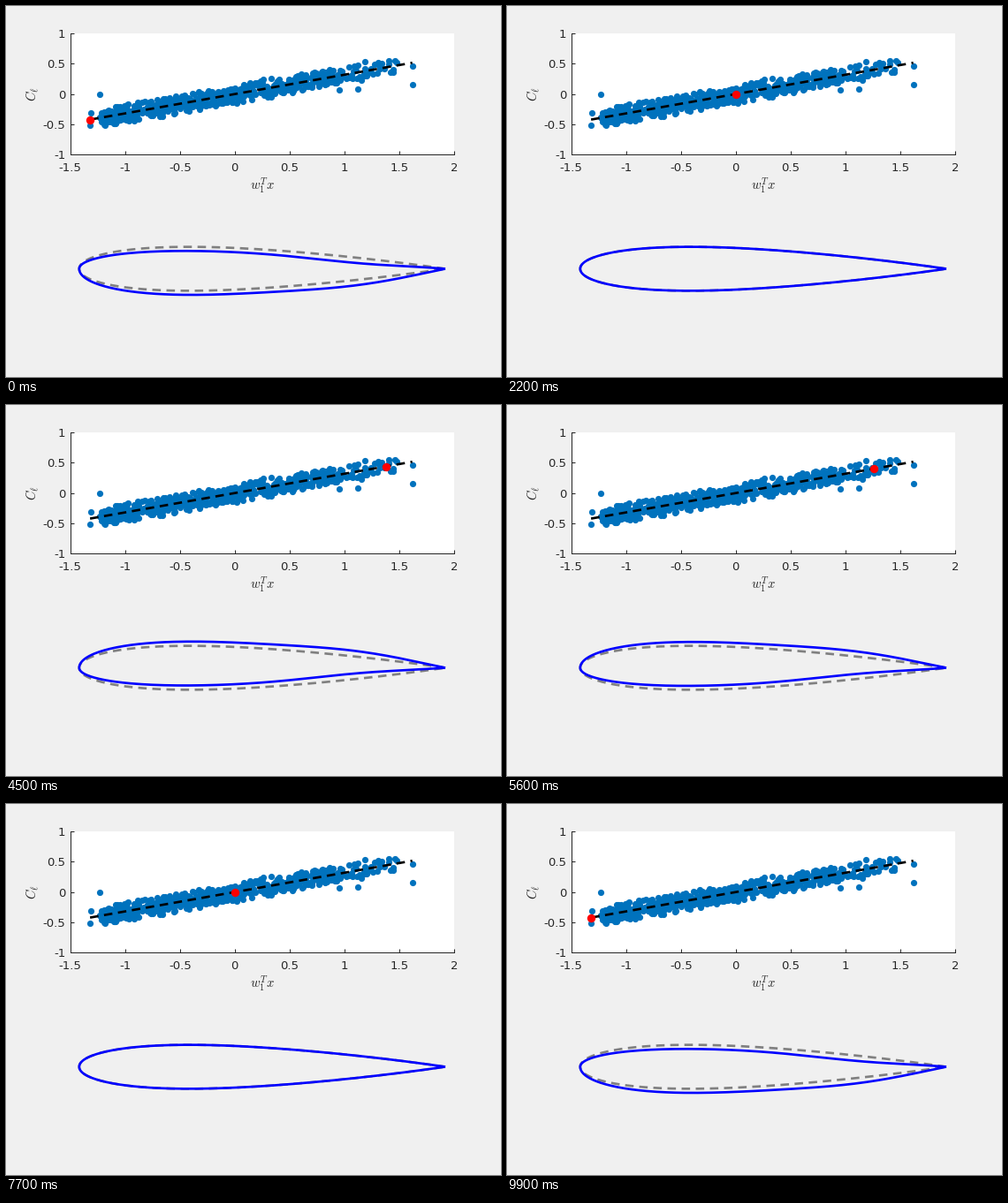
Recreate the animation shown at these times as a matplotlib script. Size 560 by 420 pixels, loop 10000 ms.

```python
import numpy as np
import matplotlib.pyplot as plt
from matplotlib.animation import FuncAnimation

W, H, DPI = 560, 420, 100
PT = 72 / DPI  # points per pixel
INK = "#262626"
SLOPE = 0.3185
T_MIN, T_MAX = -1.32, 1.62
HALF = 50  # frames per sweep

plt.rcParams.update({
    "font.family": "DejaVu Sans",
    "mathtext.fontset": "cm",
    "lines.scale_dashes": False,
    "lines.solid_capstyle": "butt",
    "lines.dash_capstyle": "butt",
})

fig = plt.figure(figsize=(W / DPI, H / DPI), dpi=DPI, facecolor="#f0f0f0")


def make_chart():
    left, right, top, bottom = 72.8, 506.8, 31, 168.4
    ax = fig.add_axes([left / W, 1 - bottom / H,
                       (right - left) / W, (bottom - top) / H])
    ax.set(xlim=(-1.5, 2), ylim=(-1, 1))
    x_ticks = np.arange(-1.5, 2.1, 0.5)
    y_ticks = np.arange(-1, 1.1, 0.5)
    ax.set_xticks(x_ticks, [f"{v:g}" for v in x_ticks])
    ax.set_yticks(y_ticks, [f"{v:g}" for v in y_ticks])
    ax.tick_params(direction="in", length=4.3 * PT, width=PT, color=INK,
                   labelcolor=INK, labelsize=13.3 * PT)
    ax.tick_params(axis="x", pad=8.4 * PT)
    ax.tick_params(axis="y", pad=5.5 * PT)
    ax.spines[["top", "right"]].set_visible(False)
    ax.spines[["left", "bottom"]].set(color=INK, linewidth=PT)
    return ax


def samples():
    """Noisy cloud around the trend, plus a few points that stand apart."""
    rng = np.random.default_rng(12)
    x = -1.23 + 2.7 * rng.beta(0.95, 1.45, 560)
    noise = rng.normal(0, 0.085, x.size)
    noise = np.where(abs(noise) > 0.16, noise * 0.5, noise)
    apart_x = [-1.32, -1.315, -1.23, 0.955, 1.125, 1.48, 1.62, 1.625]
    apart_y = [-0.51, -0.31, -0.01, 0.07, 0.08, 0.52, 0.46, 0.16]
    return np.append(x, apart_x), np.append(SLOPE * x + noise, apart_y)


# Airfoil geometry in pixels, chord running from 0 to 1
NOSE, MID, CHORD = 82.8, 297.5, 414.2
s = (1 - np.cos(np.linspace(0, np.pi, 160))) / 2
thick = 0.6 * CHORD * (0.2969 * np.sqrt(s) - 0.126 * s - 0.3516 * s**2
                       + 0.2843 * s**3 - 0.1036 * s**4)

# Camber mode: class function times a bump towards the tail
bump = np.exp(-((s - 0.86) / 0.24) ** 2)
camber = np.sqrt(s) * (1 - s) * (12 + 20 * bump)


def foil(t):
    shift = camber * t / T_MIN
    upper = MID - thick + shift
    lower = MID + thick + shift
    x = NOSE + CHORD * s
    return np.append(x[::-1], x[1:]), np.append(upper[::-1], lower[1:])


def sweep(i):
    step = i if i < HALF else 2 * HALF - 1 - i
    return T_MIN + (T_MAX - T_MIN) * step / (HALF - 1)


chart = make_chart()
dashed = dict(lw=2.67 * PT, ls=(0, (9.6 * PT, 6.4 * PT)))
chart.plot(*samples(), "o", color="#0072bd", ms=7.2 * PT, mew=0)
ends = np.array([T_MIN, T_MAX])
chart.plot(ends, SLOPE * ends, color="black", **dashed)
marker, = chart.plot([], [], "o", color="red", ms=9.4 * PT, mew=0, zorder=5)

stage = fig.add_axes([0, 0, 1, 1])
stage.set(xlim=(0, W), ylim=(H, 0))
stage.axis("off")
label = dict(color=INK, fontsize=14.67 * PT, ha="center", va="center")
stage.text(289.8, 202.6, r"$w_1^T x$", **label)
stage.text(30.4, 100, r"$C_\ell$", rotation=90, **label)
stage.plot(*foil(0), color="#808080", **dashed)
outline, = stage.plot([], [], color="blue", lw=2.67 * PT)


def draw(i):
    t = sweep(i)
    marker.set_data([t], [SLOPE * t])
    outline.set_data(*foil(t))
    return marker, outline


anim = FuncAnimation(fig, draw, frames=2 * HALF, interval=100,
                     repeat=True, repeat_delay=0)
plt.show()
```
